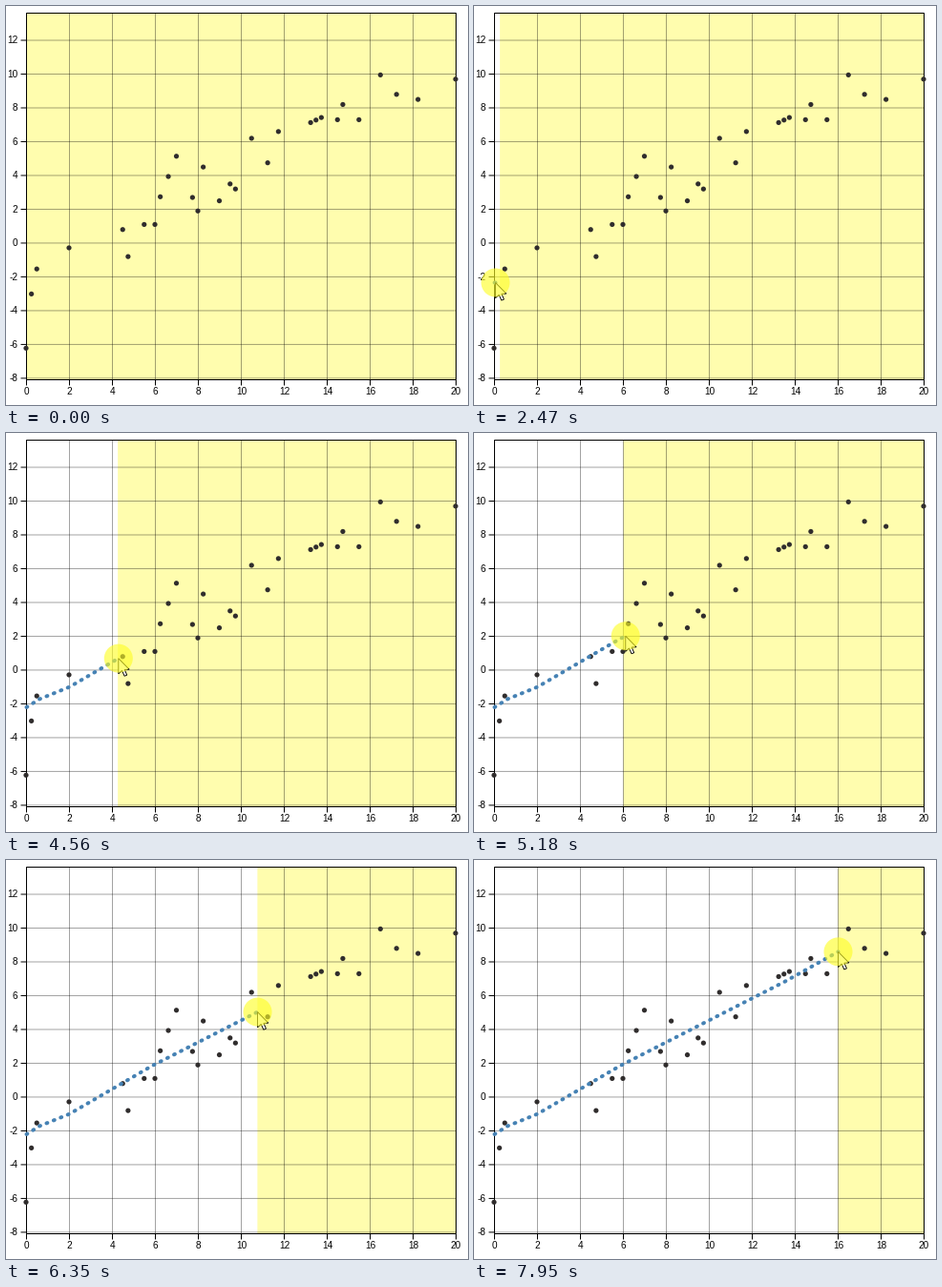
A matplotlib script that plays this animation: 484x419 px, repeating every 8000 ms.

```python
import numpy as np
import matplotlib.pyplot as plt
from matplotlib.animation import FuncAnimation
from matplotlib.patches import Circle, Polygon, Rectangle

W, H = 484, 419
LOOP, INTERVAL = 8000, 40
LEFT, RIGHT, TOP, BOTTOM = 21.5, 471.5, 7.5, 392.5
X_UNIT, Y_UNIT, Y_ZERO = 22.5, 17.745, 248.95

plt.rcParams["font.family"] = "Liberation Sans"

# At 72 dpi one point is one pixel.
fig = plt.figure(figsize=((W + .001) / 72, (H + .001) / 72), dpi=72,
                 facecolor="white")
ax = fig.add_axes([0, 0, 1, 1])
ax.set_xlim(0, W)
ax.set_ylim(H, 0)
ax.axis("off")


def px(x):
    return LEFT + X_UNIT * x


def py(y):
    return Y_ZERO - Y_UNIT * y


def segment(x0, y0, x1, y1, **style):
    ax.plot([x0, x1], [y0, y1], lw=1, snap=False, solid_capstyle="butt", **style)


def run(start, end, n):
    return list(zip(*np.linspace(start, end, n).T))


def observations():
    """A saturating start, two straight rises and the scattered rest."""
    start = [(x, -.27 - 5.95 * np.exp(-3.1 * x)) for x in (0, .25, .5, 2)]
    rises = run((6.25, 2.74), (7, 5.14), 3) + run((13.25, 7.13), (13.75, 7.43), 3)
    rest = [(4.5, .8), (4.75, -.8), (5.5, 1.1), (6, 1.1), (7.75, 2.7), (8, 1.9),
            (8.25, 4.5), (9, 2.5), (9.5, 3.5), (9.75, 3.2), (10.5, 6.2),
            (11.25, 4.75), (11.75, 6.6), (14.5, 7.3), (14.75, 8.2), (15.5, 7.3),
            (16.5, 9.95), (17.25, 8.8), (18.25, 8.5), (20, 9.7)]
    return start + rises + rest


# Bends of the drawn trend, and the pointer's value over time
TREND_X, TREND_Y = np.transpose([(0, -2.2), (.6, -1.72), (2, -1), (5.8, 1.82),
                                 (13.4, 6.75), (16, 8.6)])
DRAG_T, DRAG_X = np.transpose([(2900, 0), (3720, 1.45), (4560, 4.22), (5740, 7.8),
                               (6270, 10.5), (7060, 13.4), (7940, 16)])

cover = ax.add_patch(Rectangle((LEFT, 8), RIGHT - LEFT, 384, fc="#fffdae", lw=0,
                               zorder=1, snap=False))

grid = dict(color="black", alpha=.36, zorder=2)
axis = dict(color="black", zorder=3)
for v in range(0, 21, 2):
    x = px(v)
    if 0 < v < 20:
        segment(x, TOP, x, BOTTOM, **grid)
    segment(x, BOTTOM, x, BOTTOM + 6, **axis)
    ax.text(x, 408, str(v), size=10, ha="center", va="baseline")
for v in range(-8, 13, 2):
    y = py(v)
    segment(LEFT, y, RIGHT, y, **grid)
    segment(LEFT - 6, y, LEFT, y, **axis)
    ax.text(12.5, y + 3.2, str(v), size=10, ha="right", va="baseline")
ax.add_patch(Rectangle((LEFT, TOP), RIGHT - LEFT, BOTTOM - TOP, fill=False,
                       ec="black", lw=1, zorder=3, snap=False))

for x, y in observations():
    ax.add_patch(Circle((px(x) - .5, py(y)), 2.6, fc="#302d2d", lw=0, zorder=4))

trend, = ax.plot([], [], color="steelblue", lw=4, ls=(0, (.25, 1.75)),
                 dash_capstyle="round", snap=False, zorder=5)
ARROW = np.array([(0, 0), (0, 16.2), (3.7, 12.8), (6.3, 18.6), (8.9, 17.5),
                  (6.4, 11.8), (11.3, 11.6)])
arrow = ax.add_patch(Polygon(ARROW, fc="white", ec="black", lw=.9, zorder=6,
                             joinstyle="miter", snap=False))
halo = ax.add_patch(Circle((0, 0), 15, fc="#fefe24", alpha=.62, lw=0, zorder=7))


def progress(t, start, end):
    return np.clip((t - start) / (end - start), 0, 1)


def pointer(t):
    """Glide in and settle on the axis, then follow the trend."""
    if t < 2900:
        glide = (1 - progress(t, 70, 770)) ** 2
        settle = progress(t, 920, 1230)
        return 27 + 180 * glide - 4.5 * settle, 292.5 + 105.5 * glide - 2 * settle
    x = np.interp(t, DRAG_T, DRAG_X)
    return px(x), py(np.interp(x, TREND_X, TREND_Y))


def draw(i):
    t = i * INTERVAL + INTERVAL / 2
    x, y = pointer(t)
    arrow.set_xy(ARROW + (x, y))
    arrow.set_visible(t > 70)
    halo.set_center((x, y))
    halo.set_visible(t > 1530)

    # The uncovered part grows in quarter units.
    drawing = t > 2160
    shown = max(.25, round((x - LEFT) / X_UNIT * 4) / 4) if drawing else 0
    cover.set_bounds(px(shown), 8, RIGHT - px(shown), 384)

    if t > 2900:
        xs = np.arange(0, shown + .01, .05)
        trend.set_data(px(xs), py(np.interp(xs, TREND_X, TREND_Y)))
    else:
        trend.set_data([LEFT, LEFT + 1], [y, y])
    trend.set_visible(drawing)
    return cover, trend, halo, arrow


anim = FuncAnimation(fig, draw, frames=LOOP // INTERVAL, interval=INTERVAL,
                     init_func=lambda: draw(0), repeat=True, repeat_delay=0)
plt.show()
```
